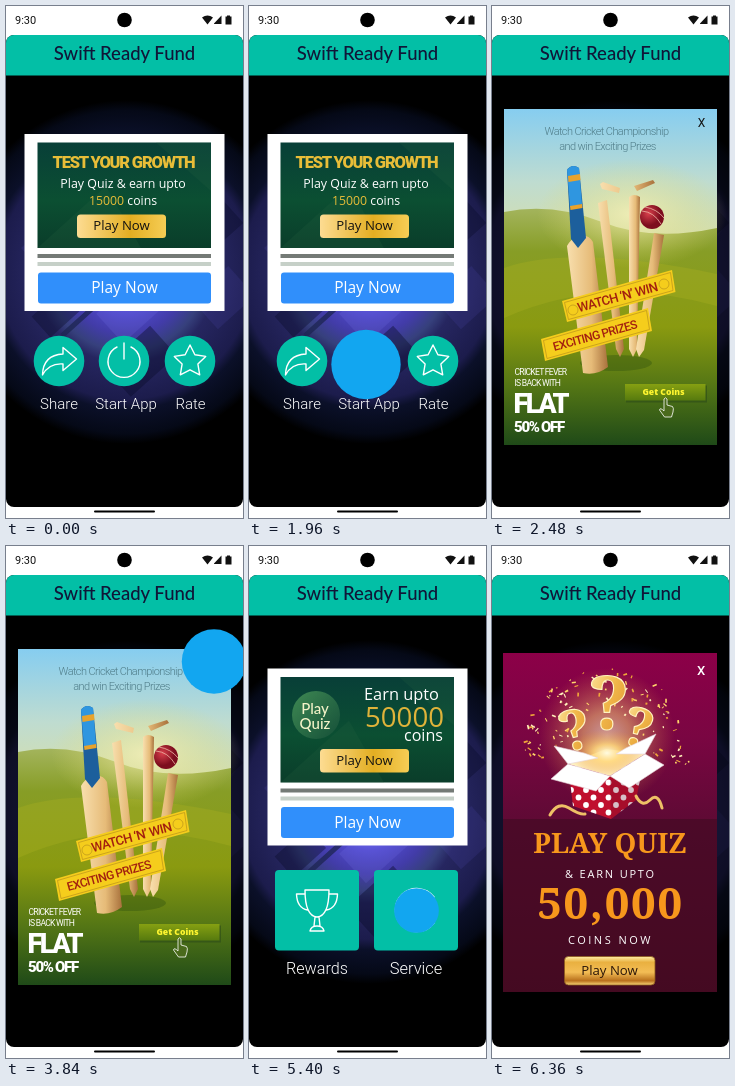
An HTML page that plays this animation: 237 by 512 pixels, repeating every 7520 ms.

```html
<!DOCTYPE html>
<html lang="en">
<head>
<meta charset="utf-8">
<title>Loan app demo</title>
<style>
html, body { margin: 0; width: 100%; height: 100%; overflow: hidden; background: #fff; }
svg { display: block; width: 100%; height: 100%; }
text { font-family: "Open Sans", "Noto Sans", sans-serif; fill: #fff; }
.mid text, text.mid { text-anchor: middle; }
.label { font: 300 15px Roboto, sans-serif; }
.line { fill: none; stroke: #fff; stroke-width: 1.4; stroke-linejoin: round; stroke-linecap: round; }
.thick { font-family: Roboto, sans-serif; font-weight: 900; }
.serif { font-family: "Noto Serif", serif; font-weight: 900; fill: #f7971c; }
.ribbon { font: 500 13px Roboto, sans-serif; letter-spacing: -.6px; fill: #a3200f; }
.badge { font: 500 15px Lato, sans-serif; fill: #f3f3c8; }
.invite { font: 300 11px Roboto, sans-serif; letter-spacing: -.6px; fill: #4f7c88; }
.fever { font: 400 8.6px Roboto, sans-serif; letter-spacing: -.75px; }
</style>
</head>
<body>
<svg viewBox="0 0 237 512" xmlns="http://www.w3.org/2000/svg">
<defs>
  <radialGradient id="glowFill">
    <stop offset="0" stop-color="#706cf6"/>
    <stop offset=".14" stop-color="#6661ea"/>
    <stop offset=".23" stop-color="#5049cc"/>
    <stop offset=".36" stop-color="#423ca8"/>
    <stop offset=".46" stop-color="#36407c"/>
    <stop offset=".53" stop-color="#262660"/>
    <stop offset=".74" stop-color="#1c1c4c"/>
    <stop offset=".8" stop-color="#0b1029"/>
    <stop offset=".94" stop-color="#050917"/>
    <stop offset="1" stop-color="#000"/>
  </radialGradient>
  <linearGradient id="green" x2="0" y2="1">
    <stop offset="0" stop-color="#083f38"/>
    <stop offset=".55" stop-color="#0b4f32"/>
    <stop offset="1" stop-color="#0a3d2a"/>
  </linearGradient>
  <linearGradient id="gold">
    <stop offset="0" stop-color="#fddc92"/>
    <stop offset=".6" stop-color="#e3ae22"/>
    <stop offset="1" stop-color="#f6cd55"/>
  </linearGradient>
  <linearGradient id="goldBar" x2="0" y2="1">
    <stop offset="0" stop-color="#fff0a8"/>
    <stop offset=".2" stop-color="#e9b040"/>
    <stop offset=".55" stop-color="#f3bd55"/>
    <stop offset=".85" stop-color="#b8701c"/>
    <stop offset="1" stop-color="#f8d878"/>
  </linearGradient>
  <linearGradient id="goldMark" x2="1" y2="1">
    <stop offset="0" stop-color="#fff0b4"/>
    <stop offset=".5" stop-color="#f0b648"/>
    <stop offset="1" stop-color="#d98a2c"/>
  </linearGradient>
  <linearGradient id="badge" x2="1" y2="1">
    <stop offset="0" stop-color="#4c9a5a"/>
    <stop offset="1" stop-color="#174f3a"/>
  </linearGradient>
  <linearGradient id="sky" x2="0" y2="1">
    <stop offset="0" stop-color="#86cdf0"/>
    <stop offset=".5" stop-color="#bfdcd0"/>
    <stop offset="1" stop-color="#dcdfa0"/>
  </linearGradient>
  <linearGradient id="field" x2="0" y2="1">
    <stop offset="0" stop-color="#a3b45c"/>
    <stop offset=".18" stop-color="#879d26"/>
    <stop offset=".5" stop-color="#8a9a10"/>
    <stop offset=".75" stop-color="#547615"/>
    <stop offset="1" stop-color="#1f4a18"/>
  </linearGradient>
  <radialGradient id="sun">
    <stop offset="0" stop-color="#f6f0b4" stop-opacity=".8"/>
    <stop offset="1" stop-color="#e0da70" stop-opacity="0"/>
  </radialGradient>
  <linearGradient id="wood">
    <stop offset="0" stop-color="#f8dfae"/>
    <stop offset=".6" stop-color="#e6bb78"/>
    <stop offset="1" stop-color="#a8713c"/>
  </linearGradient>
  <radialGradient id="ballFill" cx=".35" cy=".35">
    <stop offset="0" stop-color="#d8404c"/>
    <stop offset="1" stop-color="#7d0d1e"/>
  </radialGradient>
  <linearGradient id="olive" x2="0" y2="1">
    <stop offset="0" stop-color="#86a012"/>
    <stop offset="1" stop-color="#567a0e"/>
  </linearGradient>
  <linearGradient id="wine" x2="0" y2="1">
    <stop offset="0" stop-color="#8c0048"/>
    <stop offset=".25" stop-color="#7a0642"/>
    <stop offset=".5" stop-color="#5e0a34"/>
    <stop offset="1" stop-color="#520a28"/>
  </linearGradient>
  <radialGradient id="spark">
    <stop offset="0" stop-color="#fffbe0"/>
    <stop offset=".35" stop-color="#ffd77a" stop-opacity=".85"/>
    <stop offset="1" stop-color="#e58a3a" stop-opacity="0"/>
  </radialGradient>
  <pattern id="dots" width="15" height="15" patternUnits="userSpaceOnUse">
    <rect width="15" height="15" fill="#c0102e"/>
    <circle cx="4" cy="4" r="2.900" fill="#fff"/>
    <circle cx="11.500" cy="11.500" r="2.900" fill="#fff"/>
  </pattern>
  <clipPath id="screen"><rect y="29" width="237" height="472" rx="8"/></clipPath>
  <clipPath id="disc"><circle cx="120" cy="266" r="136"/></clipPath>

  <g id="adBase">
    <path d="M18.500 128H218.500V305H18.500z" fill="#fff"/>
    <path d="M31.500 136.500H205V242H31.500z" fill="url(#green)"/>
    <path d="M31.500 242L100 180L135 242zM150 136.500L205 185V136.500z" fill="#2c6544" opacity=".2"/>
    <rect x="71" y="208.500" width="89" height="23.500" rx="3.500" fill="url(#gold)"/>
    <path d="M31.500 248H205V252H31.500z" fill="#747a76"/>
    <path d="M31.500 256H205V260H31.500z" fill="#c6d0c8"/>
    <rect x="32" y="266.500" width="173" height="31" rx="3" fill="#308ffb"/>
    <g class="mid">
      <text x="115.500" y="224.300" font-size="13.200" style="fill:#111">Play Now</text>
      <text x="118.500" y="287" font-size="15.500">Play Now</text>
    </g>
  </g>
</defs>

<rect width="237" height="512" fill="#fff"/>

<!-- status bar -->
<text x="9" y="17.500" style="font:400 11px Roboto,sans-serif;fill:#111">9:30</text>
<circle cx="118.500" cy="14" r="7.300"/>
<path d="M196 11.500Q201.500 7.500 207 11.500L201.500 18.500zM208 18V17.500L215.500 9.500V18zM219.500 10.500H221V9.500H224V10.500H225.500V18.500H219.500z" fill="#111"/>

<g clip-path="url(#screen)">
  <rect y="29" width="237" height="472"/>
  <g id="glow">
    <circle cx="120" cy="266" r="172" fill="url(#glowFill)"/>
    <g clip-path="url(#disc)">
      <g id="shards" transform="rotate(-42 120 266)"></g>
    </g>
  </g>
  <path d="M0 29H237V69.600H0z" fill="#03bfa6"/>
  <text class="mid" x="118.500" y="54" style="font:500 18.500px Lato,sans-serif;fill:#101638">Swift Ready Fund</text>
</g>
<rect x="88" y="504.500" width="61" height="2" rx="1"/>

<!-- first page -->
<g id="home">
  <use href="#adBase"/>
  <g class="mid">
    <text class="thick" x="117.500" y="162" font-size="16.500" letter-spacing="-1.200" style="fill:#e8bd38">TEST YOUR GROWTH</text>
    <text x="117" y="181.500" font-size="12.400">Play Quiz &amp; earn upto</text>
    <text x="117" y="198.500" font-size="12.300"><tspan fill="#e8bd38">15000</tspan> coins</text>
  </g>
  <g fill="#03bfa6">
    <circle cx="53" cy="355" r="25.300"/>
    <circle cx="118" cy="355" r="25.300"/>
    <circle cx="184" cy="355" r="25.300"/>
  </g>
  <g class="line">
    <path d="M57 341.500L70.500 353L57 364.500V358Q43 357 36.500 369Q37 349 57 348z"/>
    <path d="M111 341A16 16 0 1 0 125 341M118 337V353"/>
    <path id="star"/>
  </g>
  <g class="mid">
    <text class="label" x="53" y="402.500">Share</text>
    <text class="label" x="120" y="402.500">Start App</text>
    <text class="label" x="184.500" y="402.500">Rate</text>
  </g>
</g>

<!-- second page -->
<g id="more">
  <use href="#adBase" y="-5.500"/>
  <circle cx="67" cy="169" r="24" fill="url(#badge)" opacity=".8"/>
  <g class="mid">
    <text class="badge" x="66" y="168">Play</text>
    <text class="badge" x="66" y="183">Quiz</text>
    <text x="152.500" y="154" font-size="16.400">Earn upto</text>
    <text x="155.500" y="180.500" font-size="27.600" style="fill:#dfb33a">50000</text>
    <text x="174.500" y="194.500" font-size="16.100">coins</text>
    <text class="label" x="68" y="428" style="font-size:16.200px">Rewards</text>
    <text class="label" x="167" y="428" style="font-size:16.500px">Service</text>
  </g>
  <g fill="#03bfa6">
    <rect x="26" y="324" width="84" height="80.500" rx="4"/>
    <rect x="125" y="324" width="84" height="80.500" rx="4"/>
  </g>
  <g class="line">
    <path d="M56 344H80Q80 370 68 371Q56 370 56 344zM56 348H47.500Q48 362 58.500 364M80 348H88.500Q88 362 77.500 364M66 371L65 380M70 371L71 380M61 385Q62 380 68 380Q74 380 75 385z"/>
    <path d="M185 351A21.500 21.500 0 1 0 185 377"/>
  </g>
</g>

<!-- cricket offer -->
<g id="offer">
  <path d="M12 103H225V250H12z" fill="url(#sky)"/>
  <path d="M12 206Q60 196 110 216T225 222V439H12z" fill="url(#field)"/>
  <ellipse cx="140" cy="208" rx="95" ry="55" fill="url(#sun)"/>
  <path d="M12 262Q80 238 225 268V300Q110 268 12 312z" fill="#a8b020" opacity=".35"/>
  <g class="mid">
    <text class="invite" x="114.500" y="128.500">Watch Cricket Championship</text>
    <text class="invite" x="115.500" y="144">and win Exciting Prizes</text>
    <text x="209.500" y="121" style="font:400 12px Roboto,sans-serif;fill:#111">X</text>
  </g>
  <ellipse cx="124" cy="357" rx="36" ry="8" fill="#2a4a10" opacity=".35"/>
  <g fill="url(#wood)">
    <path d="M106 197L115 194L132 343L128 351L124 343z"/>
    <path d="M137 191Q142 187 148 191L145 343L141 351L137 343z"/>
    <path d="M162 227L172 229L152 344L147 351L144 343z"/>
    <path d="M108 178L111 176L128 182L127 187L110 183zM142 180L161 174L163 177L145 185z"/>
    <path d="M75 240Q80 231 85 232Q95 226 101 236L116 361Q104 370 91 367z"/>
  </g>
  <path d="M75 164Q80 157 87 162L94 232L86 242L79 233z" fill="#1c5f9c"/>
  <path d="M75 164Q80 157 87 162L90 198L78 201z" fill="#2f96e0"/>
  <path d="M76 170L88 168L88.500 174L76.500 176zM78 200L90 198L90.500 202L78.500 204z" fill="#e8a32c"/>
  <circle cx="160" cy="211" r="12" fill="url(#ballFill)"/>
  <path d="M150 205Q162 206 169 218M153 201Q165 203 172 212" fill="none" stroke="#eeb9a8" stroke-width=".8"/>
  <g fill="#f5cd1c">
    <path d="M70 295L180 264L183.500 286L75 316z"/>
    <path d="M49 333L156 302L160 325L53 355z"/>
  </g>
  <g fill="none" stroke="#b9921c" stroke-width=".7">
    <path d="M72.500 296.500L178.500 266.500L181 284.500L76.500 313.500zM51.500 334.500L154.500 304.500L157.500 323.500L55 352.500z"/>
    <circle cx="81" cy="304" r="5"/>
    <circle cx="172" cy="278" r="5"/>
  </g>
  <g class="mid">
    <text class="ribbon" transform="translate(126.500 295.500) rotate(-15)">WATCH ‘N’ WIN</text>
    <text class="ribbon" style="font-size:12px" transform="translate(104 333.500) rotate(-15.500)">EXCITING PRIZES</text>
  </g>
  <text class="fever" x="22.500" y="369">CRICKET FEVER</text>
  <text class="fever" x="22.500" y="380">IS BACK WITH</text>
  <text class="thick" x="21.500" y="407" font-size="27" letter-spacing="-2.500">FLAT</text>
  <text class="thick" x="22" y="425.500" font-size="15" letter-spacing="-1.300">50% OFF</text>
  <path d="M134 379.500H215V396.500H134z" fill="#2c4c18" opacity=".6"/>
  <path d="M133 378H213.500V394.500H133z" fill="url(#olive)"/>
  <text class="mid" x="171.500" y="389.300" style="font:800 8.600px 'Open Sans',sans-serif;fill:#fff630">Get Coins</text>
  <path d="M172 402V393Q173.500 390.500 175 393V399L180.500 400.500Q182 402 181 406L179.500 411H172.500L167.500 404Q168 401 172 405z" fill="#4a6a1c" stroke="#fff" stroke-width=".8"/>
</g>

<!-- quiz offer -->
<g id="quiz">
  <path d="M11 107H225V446H11z" fill="url(#wine)"/>
  <path d="M11 273H225V446H11z" fill="#300a18" opacity=".4"/>
  <text class="mid" x="209" y="129" style="font:500 13px Roboto,sans-serif">X</text>
  <circle cx="115" cy="190" r="68" fill="url(#spark)" opacity=".6"/>
  <g id="confetti"></g>
  <path d="M76 218L114 203L153 208L118 230z" fill="#fff3c4"/>
  <ellipse cx="115" cy="207" rx="38" ry="24" fill="url(#spark)"/>
  <g class="mid" stroke="#fff3c0" stroke-width="1.200">
    <text class="serif" x="117" y="183" font-size="74" style="fill:url(#goldMark)">?</text>
    <text class="serif" font-size="56" style="fill:url(#goldMark)" transform="translate(88 203) rotate(-14)">?</text>
    <text class="serif" font-size="54" style="fill:url(#goldMark)" transform="translate(142 200) rotate(14)">?</text>
  </g>
  <path d="M76 218L118 230L153 208L144 254L119 273L81 260z" fill="url(#dots)"/>
  <path d="M118 230L153 208L144 254L119 273z" fill="#5e0620" opacity=".25"/>
  <g fill="#fff" stroke="#e6d3d8" stroke-width=".6">
    <path d="M76 218L118 230L104 245L59 233z"/>
    <path d="M153 208L118 230L137 242L172 219z"/>
    <path d="M76 218L62 200L92 207L106 212z"/>
    <path d="M153 208L164 188L134 202L124 208z"/>
  </g>
  <g fill="none" stroke="#eec066" stroke-width="3" stroke-linecap="round">
    <path d="M58 269Q66 255 77 262T93 268"/>
    <path d="M144 250Q150 262 158 254T170 262"/>
  </g>
  <g class="mid">
    <text class="serif" x="118" y="307" font-size="27.800">PLAY QUIZ</text>
    <text x="118.500" y="332" font-size="11" letter-spacing="1.800">&amp; EARN UPTO</text>
    <text class="serif" x="118.500" y="372.500" font-size="44" letter-spacing="1.800">50,000</text>
    <text x="118.500" y="398" font-size="11" letter-spacing="2.500">COINS NOW</text>
  </g>
  <rect x="72.500" y="410.500" width="90.500" height="28.500" rx="4" fill="url(#goldBar)" stroke="#8c5a1c" stroke-width=".8"/>
  <text class="mid" x="117.500" y="429" font-size="13.200" style="fill:#2a1508">Play Now</text>
</g>

<circle id="tap" fill="#12a6f0"/>
</svg>

<script>
const LOOP = 7520, STEP = 40, TAP_MS = 720, TAP_R = 37, ZOOM_MS = 360;
const $ = id => document.getElementById(id);
const clamp = v => Math.max(0, Math.min(1, v));

const taps = [
  { at: 1320, x: 117, y: 358.5 },
  { at: 3240, x: 208, y: 115.5 },
  { at: 4920, x: 167.5, y: 364.5 }
];

let seed = 7;
function rnd() {
  seed = (seed * 16807) % 2147483647;
  return seed / 2147483647;
}

function add(parent, tag, attrs) {
  const el = document.createElementNS("http://www.w3.org/2000/svg", tag);
  for (const k in attrs) el.setAttribute(k, attrs[k]);
  $(parent).append(el);
}

// x, y, width, height, colour, opacity
[
  [30, 268, 205, 5, "#1c2452", .75],
  [115, 172, 5, 92, "#1c2452", .75],
  [70, 277, 58, 40, "#8f8cff", .13],
  [142, 224, 92, 42, "#5c58d0", .16],
  [58, 178, 56, 58, "#5c58d0", .13],
  [150, 286, 26, 24, "#8ea2d8", .16],
  [20, 236, 44, 28, "#0b0e2c", .4],
  [150, 160, 60, 34, "#0b0e2c", .45],
  [128, 196, 40, 24, "#151a48", .5],
  [40, 322, 62, 40, "#0b0e2c", .42],
  [150, 330, 50, 40, "#5c58d0", .13],
  [196, 278, 44, 30, "#0b0e2c", .4]
].forEach(([x, y, width, height, fill, opacity]) =>
  add("shards", "rect", { x, y, width, height, fill, opacity }));

for (let i = 0; i < 120; i++) {
  const a = -Math.PI * (rnd() * 1.1 - .05), d = 25 + 58 * Math.sqrt(rnd());
  const x = 115 + d * Math.cos(a), y = 205 + d * Math.sin(a);
  add("confetti", "rect", {
    x, y, width: 1 + 3.5 * rnd(), height: .8 + 1.2 * rnd(),
    fill: ["#ffd66b", "#f0a63a", "#fff0b8"][i % 3],
    transform: `rotate(${rnd() * 180} ${x} ${y})`
  });
}

const starPoints = Array.from({ length: 10 }, (_, i) => {
  const a = i * Math.PI / 5 - Math.PI / 2, r = i % 2 ? 8.3 : 16.5;
  return (184 + r * Math.cos(a)).toFixed(1) + " " + (355.5 + r * Math.sin(a)).toFixed(1);
});
$("star").setAttribute("d", "M" + starPoints.join("L") + "z");

function show(id, on) {
  $(id).setAttribute("visibility", on ? "visible" : "hidden");
}

function zoom(id, s, x, y) {
  show(id, s > 0);
  $(id).setAttribute("transform", `translate(${x} ${y}) scale(${s}) translate(${-x} ${-y})`);
}

function drawTap(t) {
  const tap = taps.find(p => t >= p.at && t < p.at + TAP_MS + 3 * STEP);
  show("tap", tap);
  if (!tap) return;
  const age = t - tap.at;
  const u = clamp((age + STEP) / (TAP_MS + STEP)) ** 1.48;
  const el = $("tap");
  el.setAttribute("cx", tap.x);
  el.setAttribute("cy", tap.y);
  el.setAttribute("r", TAP_R * u * u * (3 - 2 * u));
  el.setAttribute("opacity", 1 - clamp((age - TAP_MS) / (3 * STEP)));
}

function draw(t) {
  const offerOn = t >= 2080 && t < 4120, quizOn = t > 6000;
  show("home", t < 4120);
  show("more", t >= 4120 && t < 6000);
  zoom("offer", offerOn ? clamp((t - 2120) / ZOOM_MS) : 0, 118, 358);
  zoom("quiz", quizOn ? clamp((t - 6000) / ZOOM_MS) : 0, 118, 276.5);
  $("glow").setAttribute("opacity", offerOn || quizOn ? .5 : 1);
  drawTap(t);
}

const start = performance.now();
function tick() {
  const t = (performance.now() - start) % LOOP;
  draw(Math.floor(t / STEP) * STEP);
  requestAnimationFrame(tick);
}
draw(0);
requestAnimationFrame(tick);
</script>
</body>
</html>
```
